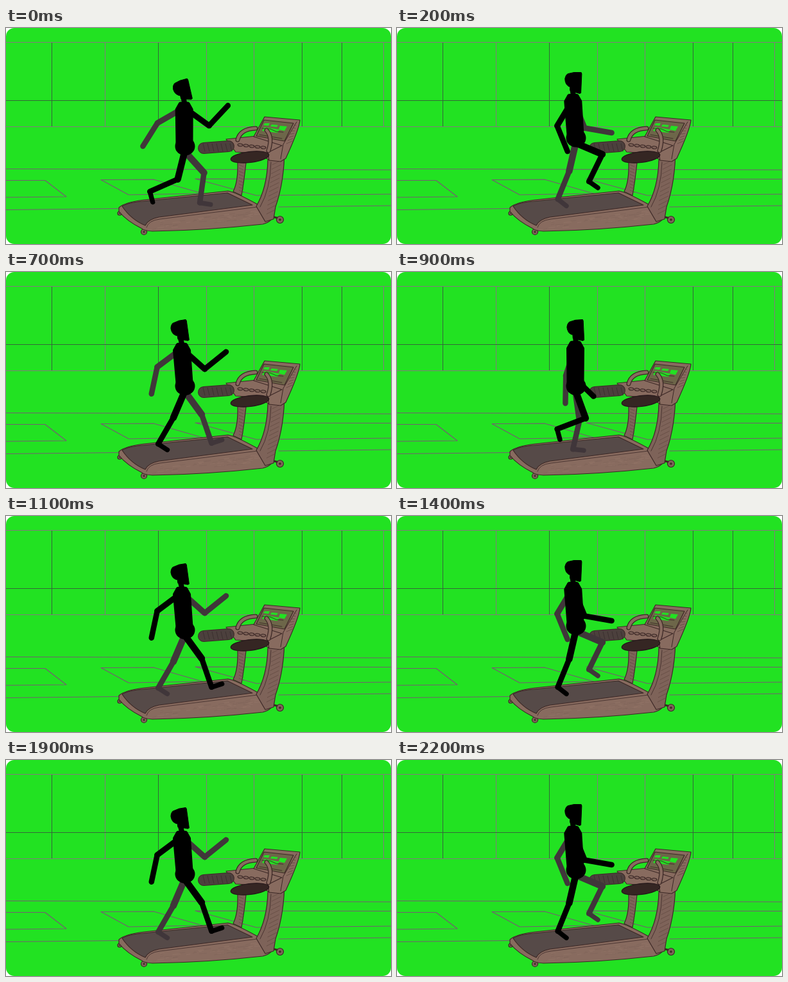
An HTML page with a canvas for the animation above (2300 ms loop, 600 by 338 pixels).

```html
<!DOCTYPE html>
<html lang="en">
<head>
<meta charset="utf-8">
<title>Treadmill walk</title>
<style>
html, body { margin: 0; width: 100%; height: 100%; overflow: hidden; background: #fff; }
canvas { display: block; width: 100vw; height: 100vh; }
</style>
</head>
<body>
<canvas id="stage" width="600" height="338"></canvas>
<script>
const W = 600, H = 338, STEP = 100, STEPS = 23, PHASES = 8;
const INK = '#3c2826', BROWN = '#886b5f', SHADE = '#7e6359', HATCH = '#614840';
const GREEN = '#22e222', NEAR = '#000', FAR = '#40363a';
const ctx = document.getElementById('stage').getContext('2d');
const scene = document.createElement('canvas');
scene.width = W;
scene.height = H;

// Joint angles over one stride, in degrees from straight down, forward positive.
// The far side follows half a stride later.
const stride = {
  thigh: [-14, 20, 67, 36, 42, 8, -13, -23],
  shin: [-66, -69, -26, 19, -8, -13, -22, -30],
  foot: [15, 15, 55, 108, 81, 84, 52, 57],
  upperArm: [54, -3, -31, -53, -60, -18, 22, 48],
  forearm: [137, 46, 22, -12, -32, -1, 80, 129]
};
const size = { thigh: 45, shin: 47.5, foot: 17, upperArm: 48, forearm: 43 };
const girth = { thigh: 10.5, shin: 8.5, foot: 7.5, upperArm: 9, forearm: 8.5 };

const HEAD = new Path2D('M-21 1L-12 -1H-1L0 1L-1 31L-3 32L-10 30L-11 23L-20 21' +
  'Q-26 17 -26 9Q-25 3 -21 1ZM-18 18H-10V27H-18Z');

function line(g, color, width, ...pts) {
  g.beginPath();
  for (let i = 0; i < pts.length; i += 2) g.lineTo(pts[i], pts[i + 1]);
  g.strokeStyle = color;
  g.lineWidth = width;
  g.stroke();
}

function curve(g, color, width, d) {
  g.strokeStyle = color;
  g.lineWidth = width;
  g.stroke(new Path2D(d));
}

function shape(g, fill, d, edge = INK) {
  g.fillStyle = fill;
  g.fill(new Path2D(d));
  if (edge) curve(g, edge, 1.2, d);
}

function oval(g, fill, x, y, rx, ry, turn = 0, edge) {
  g.beginPath();
  g.ellipse(x, y, rx, ry, turn, 0, 7);
  g.fillStyle = fill;
  g.fill();
  if (!edge) return;
  g.strokeStyle = edge;
  g.lineWidth = 1.2;
  g.stroke();
}

function drawRoom(g) {
  const dark = '#34663a', pale = '#85777f', floor = '#765a72';
  g.fillStyle = GREEN;
  g.fillRect(0, 0, W, H);
  for (const x of [71.5, 237.5, 461.5, 523.5]) line(g, dark, 1, x, 23, x, 154);
  for (const x of [154.5, 312.5, 386.5, 588.5]) line(g, pale, 1, x, 23, x, 154);
  line(g, pale, 1, 0, 22.5, W, 22.5);
  line(g, dark, 1, 0, 113.5, W, 113.5);
  line(g, pale, 1, 0, 154.5, W, 154.5);
  curve(g, floor, 1.2, 'M0 220.5L600 222M0 238.5H61L94 264L0 265M0 284.5L180 282.5' +
    'M300 259L191 261L148 237.5L230 237L310 260M600 236.5L295 236L390 262L600 260M425 280L600 278');
}

function drawBase(g) {
  for (const [x, y, r] of [[177, 290, 3], [215, 319, 4.5], [427, 300, 5.5]]) {
    oval(g, SHADE, x, y, r, r, 0, INK);
    oval(g, INK, x, y, r / 3, r / 3);
  }
  line(g, INK, 3, 414, 295, 422, 297);
  shape(g, BROWN, 'M176 281Q184 273 215 269L346 255Q358 257 392 276L418 288Q417 303 400 307' +
    'Q310 317 228 318Q214 317 212 314Q188 302 176 287Z');
  shape(g, '#564a48', 'M181 279Q190 273 215 271L345 258L384 277L238 296Q222 299 217 309Q195 300 181 279Z');
  curve(g, INK, 0.8, 'M219 312Q222 301 240 299L392 280');
}

// Loose pencil strokes along the side panel.
function drawGrain(g) {
  let seed = 7;
  const rnd = () => (seed = seed * 16807 % 2147483647) / 2147483647;
  for (let i = 0; i < 60; i++) {
    const x = 228 + rnd() * 160;
    const y = 304 - (x - 230) * 0.11 + rnd() * 12;
    line(g, rnd() < 0.5 ? SHADE : '#95786b', 0.6, x, y, x + 4 + rnd() * 8, y - 1);
  }
}

function drawUpright(g) {
  shape(g, SHADE, 'M361 210L374 211Q371 240 367 262L354 256Q362 240 361 210Z');
  for (let y = 214; y < 256; y += 5) line(g, HATCH, 0.7, 363, y, 370, y + 3);
  shape(g, SHADE, 'M408 207L434 188Q434 240 420 280L417 299L404 303L390 279Q407 250 408 207Z');
  curve(g, INK, 0.8, 'M413 210Q412 252 396 280');
  for (let i = 0; i < 12; i++) {
    const x = 415 - i * 0.8, y = 209 + i * 7;
    line(g, HATCH, 0.7, x, y + 5, x + 14, y - 2);
  }
}

function drawConsole(g) {
  shape(g, BROWN, 'M343 174L390 169L428 179L434 193L411 207L392 196L358 194Z');
  shape(g, BROWN, 'M403 139L458 144Q457 158 436 204L428 209L410 207L408 195L430 184L386 170Z');
  curve(g, INK, 1, 'M453 147L432 182L428 205');
  shape(g, '#6d6649', 'M402 144L448 149L434 177L390 169Z');
  shape(g, GREEN, 'M403 149H411L409 153L401 152ZM414 151L424 152L422 155L412 154Z' +
    'M427 153L438 154L434 161L425 159ZM402 155L426 159L423 164L399 161Z', null);
  curve(g, INK, 0.9, 'M399 157L412 158L421 162L432 163M395 167L430 173');
  for (let i = 0; i < 7; i++) line(g, HATCH, 0.8, 437 + i * 2, 181 - i * 5, 446 + i, 177 - i * 4);
  for (let i = 0; i < 5; i++) oval(g, SHADE, 365 + i * 9, 183 + i, 4, 2, 0.1, INK);
  for (const d of ['M361 175Q365 158 389 157', 'M406 160Q416 171 409 192']) {
    curve(g, INK, 7, d);
    curve(g, BROWN, 4.5, d);
  }
  line(g, INK, 18, 308, 188, 347, 185);
  line(g, '#4c403d', 16, 308, 188, 347, 185);
  for (let x = 307; x < 352; x += 7) line(g, '#382c2c', 0.8, x, 181, x + 3, 193);
  oval(g, '#352623', 380, 202, 30, 8.5, -0.12, '#241619');
}

function drawLimb(color, parts, phase, x, y) {
  for (const part of parts) {
    const a = stride[part][phase] * Math.PI / 180;
    const nx = x + size[part] * Math.sin(a), ny = y + size[part] * Math.cos(a);
    line(ctx, color, girth[part], x, y, nx, ny);
    x = nx;
    y = ny;
  }
}

function drawSide(color, phase, body) {
  drawLimb(color, ['upperArm', 'forearm'], phase, body.chestX, body.chestY + 9);
  drawLimb(color, ['thigh', 'shin', 'foot'], phase, body.hipX, body.hipY + 8);
}

// The trunk bobs and leans twice per stride.
function bodyAt(phase) {
  const a = phase * 4 * Math.PI / PHASES, c = Math.cos(a), s = Math.sin(a);
  return {
    hipX: 278.5, hipY: 178.5 + 6.5 * c,
    chestX: 276 + 1.7 * c + 2 * s, chestY: 109.3 + 6.3 * c - 1.5 * s,
    headX: 285.6 - 2.3 * c + 4.5 * s, headY: 75.3 + 4.7 * c,
    tilt: -0.125 - 0.135 * c + 0.045 * s
  };
}

function drawTrunk({ hipX, hipY, chestX, chestY }) {
  const d = `M${chestX - 6} ${chestY + 3}h12l5 9L${hipX + 10} ${hipY - 5}h-21L${chestX - 11} ${chestY + 12}Z`;
  shape(ctx, NEAR, d, null);
  curve(ctx, NEAR, 6, d);
  oval(ctx, NEAR, hipX + 0.5, hipY, 15.5, 14.5);
}

function drawHead({ headX, headY, tilt, chestX, chestY }) {
  const neckX = headX - 14 * Math.cos(tilt) - 25 * Math.sin(tilt);
  line(ctx, NEAR, 8, neckX, headY + 27, chestX + 1, chestY + 5);
  ctx.save();
  ctx.translate(headX, headY);
  ctx.rotate(tilt);
  ctx.fillStyle = NEAR;
  ctx.fill(HEAD);
  ctx.lineWidth = 1;
  ctx.stroke(HEAD);
  ctx.restore();
}

function drawWalker(phase) {
  const body = bodyAt(phase);
  drawSide(FAR, (phase + PHASES / 2) % PHASES, body);
  drawTrunk(body);
  drawSide(NEAR, phase, body);
  drawHead(body);
}

function frame(now) {
  const step = Math.floor(now / STEP) % STEPS;
  ctx.clearRect(0, 0, W, H);
  ctx.save();
  ctx.beginPath();
  ctx.roundRect(0, 0, W, H, 13);
  ctx.clip();
  ctx.drawImage(scene, 0, 0);
  drawWalker(step % PHASES);
  ctx.restore();
  requestAnimationFrame(frame);
}

const room = scene.getContext('2d');
for (const g of [ctx, room]) g.lineJoin = g.lineCap = 'round';
[drawRoom, drawBase, drawGrain, drawUpright, drawConsole].forEach(draw => draw(room));
frame(performance.now());
</script>
</body>
</html>
```
